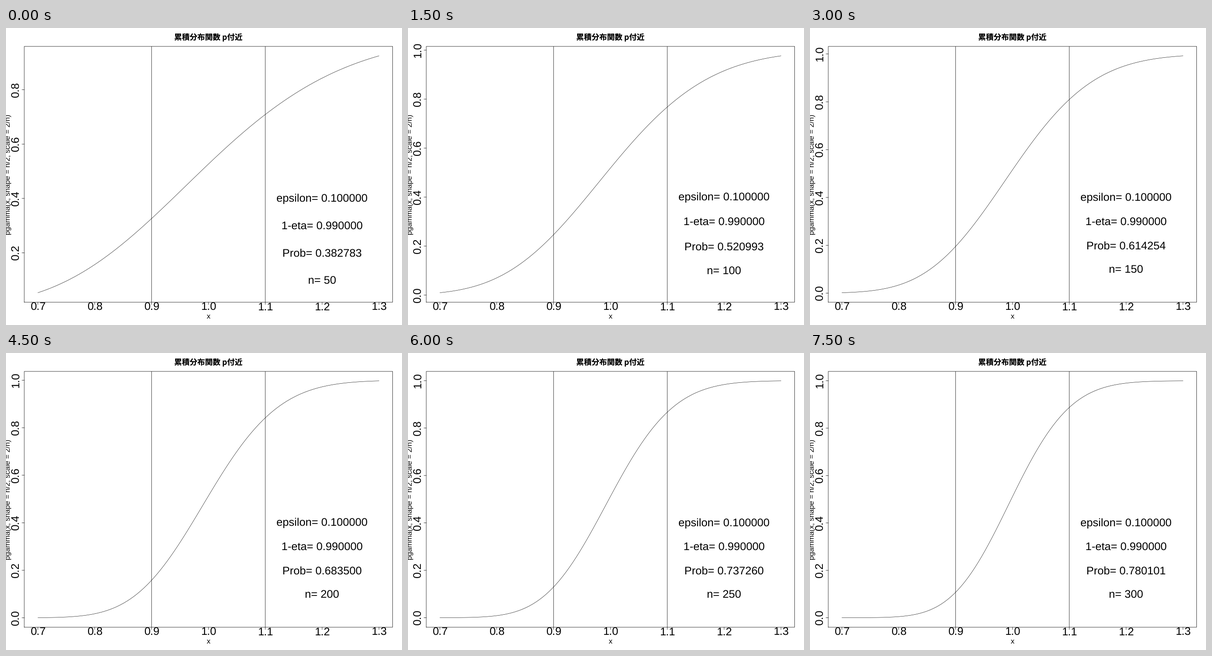
Animation, 864 px wide and 648 px high, one loop 8 s. Source, as a matplotlib script:

```python
import math

import matplotlib.pyplot as plt
import numpy as np
from matplotlib.animation import FuncAnimation

plt.rcParams["font.family"] = "Liberation Sans"
plt.rcParams["text.hinting"] = "none"

W, H, DPI = 864, 648, 72
LEFT, RIGHT, TOP, BOTTOM = 39.9, 843.6, 40.1, 598.2
PAD = 0.04 / 1.08          # share of the box left free on each side
TICK = 5
BIG, SMALL, TITLE = 24.3, 16.15, 16.8
LINE = dict(color="black", lw=0.75, snap=False)

EPS, ETA = 0.1, 0.01
X_MIN, X_MAX = 0.7, 1.3
XS = np.linspace(X_MIN, X_MAX, 101)
STEP, HOLD = 50, 3         # growth of n, frames per value of n


def pgamma(x, n):
    """Gamma CDF with shape n/2 and scale 2/n, for even n."""
    a = n // 2
    rate = a * np.atleast_1d(x)[:, None]
    k = np.arange(a)
    log_fact = np.array([math.lgamma(j + 1) for j in k])
    return 1 - np.exp(k * np.log(rate) - rate - log_fact).sum(axis=1)


def px(x):
    share = (np.asarray(x) - X_MIN) / (X_MAX - X_MIN)
    return LEFT + (RIGHT - LEFT) * (PAD + share * (1 - 2 * PAD))


def py(y, lo, hi):
    share = (np.asarray(y) - lo) / (hi - lo)
    return BOTTOM - (BOTTOM - TOP) * (PAD + share * (1 - 2 * PAD))


fig = plt.figure(figsize=(W / DPI, H / DPI), dpi=DPI, facecolor="white")
ax = fig.add_axes([0, 0, 1, 1])
ax.set(xlim=(0, W), ylim=(H, 0))
ax.axis("off")


def line(xs, ys, **kw):
    return ax.plot(xs, ys, **{**LINE, **kw})[0]


def label(x, y, s, size, **kw):
    return ax.text(x, y, s, fontsize=size, ha="center", va="baseline",
                   rotation_mode="anchor", **kw)


mid_x, mid_y = (LEFT + RIGHT) / 2, (TOP + BOTTOM) / 2

line([LEFT, RIGHT, RIGHT, LEFT, LEFT], [BOTTOM, BOTTOM, TOP, TOP, BOTTOM],
     solid_joinstyle="miter", solid_capstyle="projecting")
for edge in (1 - EPS, 1 + EPS):
    line([px(edge)] * 2, [TOP, BOTTOM], solid_capstyle="butt")

label(mid_x, 26, "累積分布関数 p付近", TITLE,
      family="Noto Sans CJK JP", weight="bold")
label(mid_x, 634.4, "x", SMALL)
label(9, mid_y, "pgamma(x, shape = n/2, scale = 2/n)", SMALL, rotation=90)

for v in np.arange(7, 14) / 10:
    line([px(v)] * 2, [BOTTOM, BOTTOM + TICK])
    label(px(v), 616, f"{v:.1f}", BIG)

y_ticks = [(v, line([], []), label(28.7, 0, f"{v:.1f}", BIG, rotation=90))
           for v in np.arange(0, 11, 2) / 10]
curve = line([], [], lw=0.62, solid_joinstyle="round")

# height on the y scale, drop of the baseline in ems, text pattern
NOTES = [(0.4, 0.285, "epsilon= {eps:f}"),
         (0.3, 0.36, "1-eta= {conf:f}"),
         (0.2, 0.36, "Prob= {prob:f}"),
         (0.1, 0.35, "n= {n}")]
notes = [label(px(1.2), 0, "", BIG) for _ in NOTES]


def update(i):
    n = STEP * (1 + i // HOLD)
    ys = pgamma(XS, n)
    lo, hi = ys[0], ys[-1]
    curve.set_data(px(XS), py(ys, lo, hi))

    for v, mark, text in y_ticks:
        y = float(py(v, lo, hi))
        shown = TOP <= y <= BOTTOM
        mark.set_data([LEFT - TICK, LEFT], [y, y])
        text.set_y(y)
        mark.set_visible(shown)
        text.set_visible(shown)

    low, high = pgamma([1 - EPS, 1 + EPS], n)
    values = dict(eps=EPS, conf=1 - ETA, prob=high - low, n=n)
    for text, (v, drop, pattern) in zip(notes, NOTES):
        text.set_text(pattern.format(**values))
        text.set_y(float(py(v, lo, hi)) + drop * BIG)
    return []


anim = FuncAnimation(fig, update, frames=16, interval=500,
                     init_func=lambda: update(0), repeat=True, repeat_delay=0)
plt.show()
```
